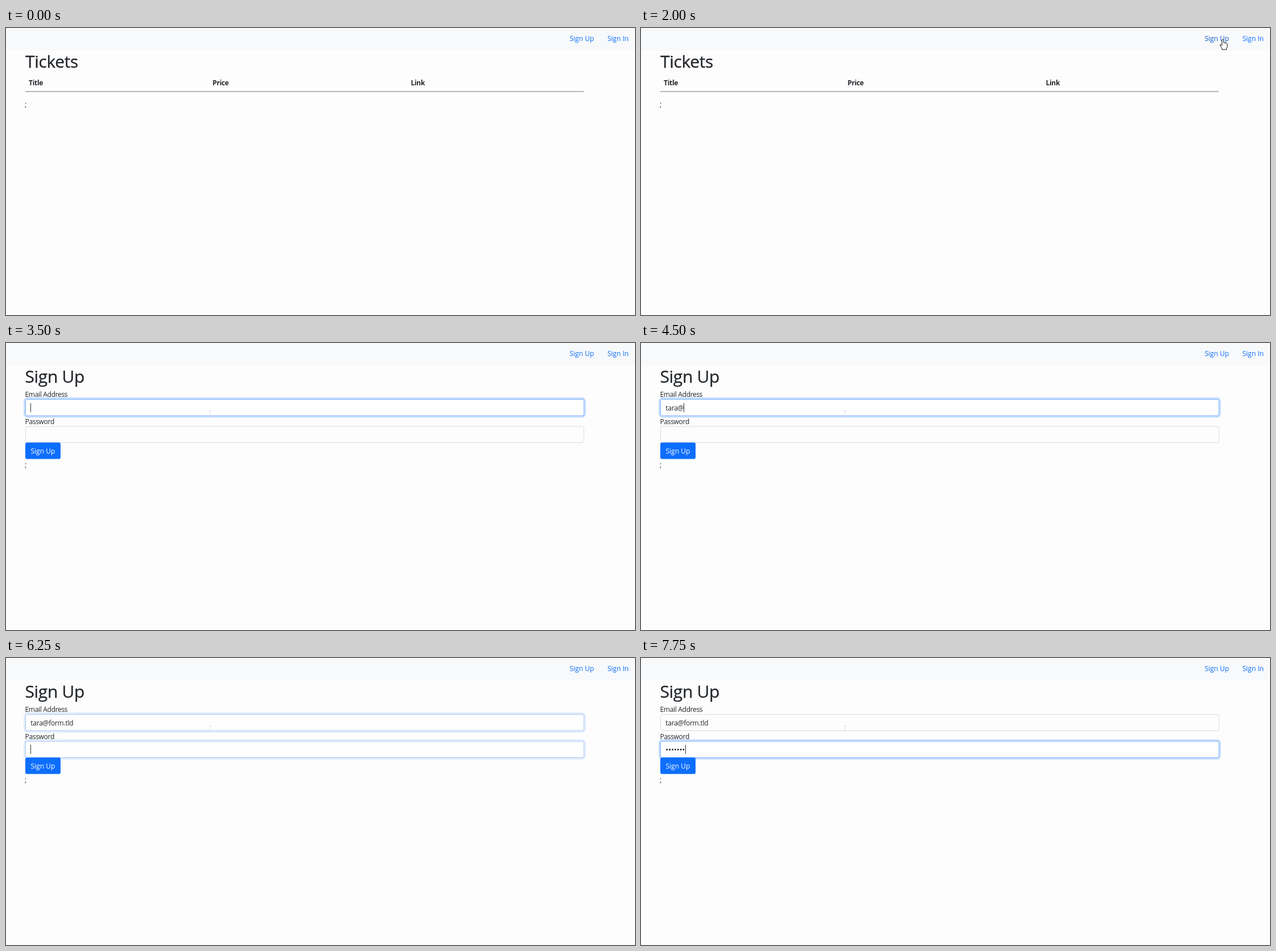
Animation of 1107 by 506 pixels, one loop 8000 ms. Source, as an HTML page:

```html
<!DOCTYPE html>
<html lang="en">
<head>
<meta charset="utf-8">
<title>Ticket sign-up</title>
<style>
  html, body { margin: 0; width: 100%; height: 100%; overflow: hidden; background: #fdfdfd; }
  svg { display: block; width: 1107px; height: 506px; }
  text { font: 12px "Open Sans", "Noto Sans", sans-serif; letter-spacing: -.02em; fill: #212529; white-space: pre; }
  .title { font-size: 30px; font-weight: 500; letter-spacing: -.012em; stroke: #212529; stroke-width: .3; }
  .head { font-weight: 700; letter-spacing: -.025em; }
  .label { letter-spacing: -.026em; }
  .link { fill: #0d6efd; letter-spacing: 0; }
  .link.hover { fill: #0a58ca; }
  .button { fill: #fff; letter-spacing: 0; }
  .dots { font-size: 13px; letter-spacing: 0; }
  .box { fill: #fdfdfd; stroke: #d6dade; }
  .ring { fill: none; stroke: #c2dbfe; stroke-width: 3; }
  .edge { fill: #fff; stroke: #86b7fe; }
  .caret { fill: #333; }
  .pointer { fill: #fff; stroke: #111; stroke-linejoin: round; }
  #beam { fill: none; stroke: #e0e0f2; }
  [hidden] { display: none; }
</style>
</head>
<body>
<svg viewBox="0 0 1107 506">
  <rect width="1107" height="39" fill="#f7f9fb"/>
  <text class="link" id="signUp" x="992" y="22.5">Sign Up</text>
  <text class="link" x="1058.5" y="22.5">Sign In</text>

  <g id="tickets">
    <text class="title" x="34" y="69.5">Tickets</text>
    <text class="head" x="40" y="101">Title</text>
    <text class="head" x="363.5" y="101">Price</text>
    <text class="head" x="712.5" y="101">Link</text>
    <rect x="34" y="111.5" width="983" height="1" fill="#6f7175"/>
    <text x="33" y="138.5">;</text>
  </g>

  <g id="form">
    <text class="title" x="33.5" y="69.5">Sign Up</text>
    <text class="label" x="33.5" y="95">Email Address</text>
    <text class="label" x="33.5" y="142.5">Password</text>
    <g id="email" transform="translate(34 99.5)">
      <rect class="box" x=".5" width="982.5" height="28.5" rx="3"/>
      <g class="glow">
        <rect class="ring" x="-1.5" y="-2" width="986.5" height="32.5" rx="5"/>
        <rect class="edge" x=".5" width="982.5" height="28.5" rx="3"/>
      </g>
      <text class="value" x="9.3" y="19"></text>
      <rect class="caret" y="6.5" width="1" height="16"/>
    </g>
    <g id="password" transform="translate(34 147)">
      <rect class="box" x=".5" width="982.5" height="28.5" rx="3"/>
      <g class="glow">
        <rect class="ring" x="-1.5" y="-2" width="986.5" height="32.5" rx="5"/>
        <rect class="edge" x=".5" width="982.5" height="28.5" rx="3"/>
      </g>
      <text class="value dots" x="9.3" y="19"></text>
      <rect class="caret" y="6" width="1" height="16"/>
    </g>
    <rect x="34" y="175.5" width="62" height="29" rx="3" fill="#0d6efd"/>
    <text class="button" x="43.5" y="194.5">Sign Up</text>
    <text x="33" y="218.5">;</text>
  </g>

  <path class="pointer" id="arrow" d="M0 0V15L3.5 11.8L6 17.5L8.3 16.5L5.9 11H10.8Z"/>
  <path class="pointer" id="hand" d="M-1.5 1.2Q0-.8 1.5 1.2V6Q3 5 4 6.6Q5.5 5.8 6.2 7.4Q8 7 8 9V13L6.5 15.5V18H-1.5V16L-4.8 11Q-5.2 8.8-3 9.3L-1.5 11Z"/>
  <path id="beam" d="M-2.5-5.5H2.5M0-5.5V5.5"/>
</svg>
<script>
const LOOP = 8000, STEP = 250;
const ADDRESS = "tara@form.tld";
const $ = id => document.getElementById(id);

// [time, x, y] of the pointer's hot spot
const path = [
  [250, 380, 238], [500, 545, 190], [750, 745, 132], [1000, 925, 76], [1250, 1011, 43],
  [1500, 1026, 18], [1750, 1024, 20], [2250, 1024, 20], [2500, 880, 72],
  [2750, 560, 148], [3000, 359, 128], [3250, 359, 125]
];
// [time, characters typed]
const emailKeys = [[3500, 0], [4000, 1], [4250, 3], [4500, 5], [4750, 6], [5000, 7],
  [5250, 8], [5500, 9], [5750, 11], [6000, 13]];
const passwordKeys = [[6500, 0], [6750, 2], [7000, 4], [7500, 5], [7750, 7]];

function along(keys, t) {
  const next = keys.findIndex(k => k[0] > t);
  if (next < 0) return keys[keys.length - 1].slice(1);
  if (next === 0) return keys[0].slice(1);
  const a = keys[next - 1], b = keys[next], p = (t - a[0]) / (b[0] - a[0]);
  return a.slice(1).map((v, i) => v + (b[i + 1] - v) * p);
}

const show = (el, on) => el.toggleAttribute("hidden", !on);
const clamp = v => Math.max(0, Math.min(1, v));

function drawField(field, text, glow, focused) {
  const value = field.querySelector(".value"), caret = field.querySelector(".caret");
  value.textContent = text;
  field.querySelector(".glow").setAttribute("opacity", glow);
  show(caret, focused);
  const width = text ? value.getComputedTextLength() : 0;
  caret.setAttribute("x", Math.round(9.3 + width));
}

function render(t) {
  const onForm = t >= 2250;
  show($("tickets"), !onForm);
  show($("form"), onForm);
  $("signUp").classList.toggle("hover", t >= 1500 && t < 3250);

  const shape = t < 250 ? "" : t >= 3000 ? "beam" : t >= 1500 && t < 2500 ? "hand" : "arrow";
  const [x, y] = along(path, t);
  for (const id of ["arrow", "hand", "beam"]) {
    show($(id), id === shape);
    $(id).setAttribute("transform", `translate(${x} ${y})`);
  }

  const fadeIn = clamp((t - 3000) / 500), swap = clamp((t - 6000) / 500);
  const typed = Math.floor(along(emailKeys, t)[0]);
  const dots = Math.floor(along(passwordKeys, t)[0]);
  drawField($("email"), ADDRESS.slice(0, typed), fadeIn * (1 - swap), t >= 3250 && t < 6250);
  drawField($("password"), "•".repeat(dots), swap, t >= 6250);
}

const start = performance.now();
let last = -1;
function tick() {
  const t = Math.floor(((performance.now() - start) % LOOP) / STEP) * STEP;
  if (t !== last) render(last = t);
  requestAnimationFrame(tick);
}
tick();
</script>
</body>
</html>
```
